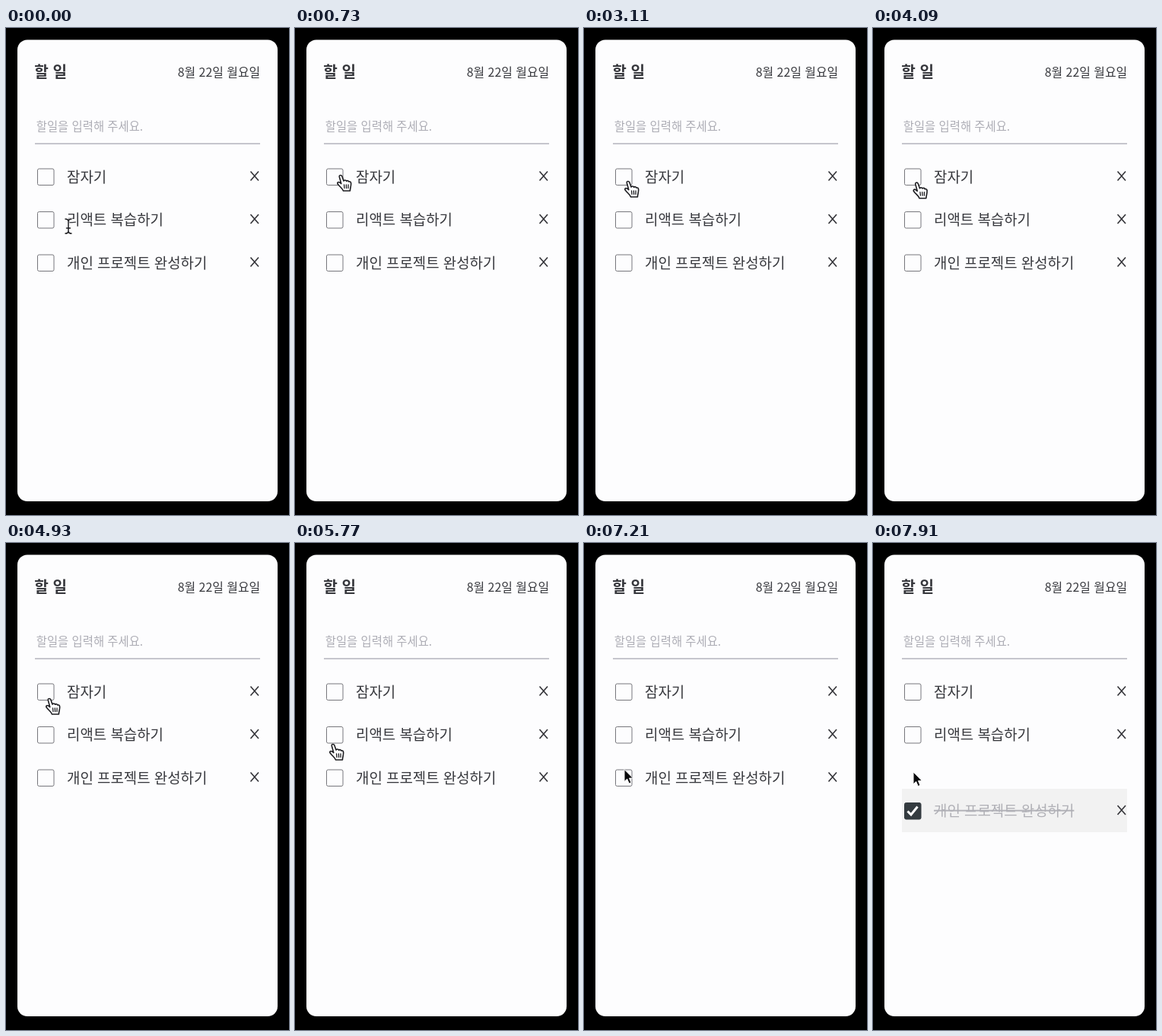
These frames come from a looping animation (372 px wide and 640 px high, 8000 ms). An HTML page:

```html
<!DOCTYPE html>
<html lang="ko">
<head>
<meta charset="utf-8">
<title>할 일</title>
<style>
  html, body { margin: 0; width: 100%; height: 100%; overflow: hidden; background: #000; }
  svg { display: block; width: 372px; height: 640px; font-family: "Noto Sans CJK KR", "Noto Sans CJK", sans-serif; }
  text { fill: #37383d; }
  .title { font-size: 20.2px; font-weight: 700; }
  .date { font-size: 15.9px; text-anchor: end; }
  .hint { font-size: 15.4px; font-weight: 300; fill: #adadb5; }
  .label { font-size: 18.9px; }
  .box { fill: none; stroke: #77777c; }
  .cross { fill: none; stroke: #333338; stroke-width: 1.6; }
  .tick { fill: none; stroke: none; stroke-width: 3; }
  .band { fill: none; }
  .done .band { fill: #f2f2f2; }
  .done .box { fill: #343b40; stroke: #343b40; }
  .done .tick { stroke: #fff; }
  .done .label { fill: #b0b0b6; text-decoration: line-through; }
</style>
</head>
<body>
<svg viewBox="0 0 372 640">
  <rect width="372" height="640"/>
  <rect x="15" y="15.5" width="342" height="606.5" rx="13" fill="#fdfdfe"/>
  <text class="title" x="37.3" y="64.9">할 일</text>
  <text class="date" x="334.2" y="64">8월 22일 월요일</text>
  <text class="hint" x="39.8" y="134.8">할일을 입력해 주세요.</text>
  <path d="M38 152H334" stroke="#b4b4bc" stroke-width="1.3"/>
  <g id="rows"></g>
  <g id="cursor">
    <g id="beam" fill="none" stroke-linecap="round">
      <use href="#beamLine" stroke="#fff" stroke-width="3"/>
      <use href="#beamLine" stroke="#1c1c20" stroke-width="1.5"/>
    </g>
    <path id="arrow" d="M0 0V16L3.7 12.6L6.2 18.6L9 17.4L6.5 11.6H11.5Z" fill="#08080a" stroke="#fdfdfe"/>
    <g id="hand" transform="translate(-5 -1)" stroke="#1c1c20" stroke-width="1.6" stroke-linejoin="round" stroke-linecap="round">
      <path d="M4.2 2.2C4 .2 7 -.2 7.8 1.8L10 8C11 6.6 13 6.8 13.6 8.2C14.6 7.2 16.2 7.6 16.8 9C18.2 8.4 19.6 9.4 19.6 11.2C20 14.5 18.6 16.5 18.4 21H9.5C8.5 18 5.5 16 3 13C.5 10.5 2.5 8.6 4.8 10L6.8 11.6Z" fill="#fff"/>
      <path d="M10.5 13L11 17.5M13.3 13L13.6 17.5M16 13V17.5" fill="none" stroke-width="1.3"/>
    </g>
  </g>
  <defs>
    <path id="beamLine" d="M-4 -9Q-.5 -9 0 -6.5Q.5 -9 4 -9M0 -6.5V7.5M-4 10Q-.5 10 0 7.5Q.5 10 4 10M-2.5 3H2.5"/>
  </defs>
</svg>
<script>
const LOOP = 8000;
const CHECK_AT = 7600;
const LAST_ROW = 308.5, DONE_ROW = 352;
const $ = id => document.getElementById(id);

// time, x, y of the pointer's hot spot
const path = [
  [0, 82, 260], [30, 82, 260], [650, 59, 194], [1610, 59, 194],
  [2570, 59, 194], [3110, 57, 202], [4930, 56, 205], [5070, 56, 205],
  [5750, 49, 265], [5910, 49, 265], [6650, 53, 297.5],
  [7490, 53, 297.5], [7800, 53, 301], [LOOP, 53, 301]
];
const shapes = [[0, 'beam'], [270, 'arrow'], [430, 'hand'], [6110, 'arrow']];

const rowMarkup = (label, y) => `<g class="row" transform="translate(0 ${y})">
  <rect class="band" x="38" y="-29" width="296" height="57"/>
  <rect class="box" x="41.5" y="-10.5" width="21.5" height="21.5" rx="2"/>
  <path class="tick" d="M45.5 .5L50 5L58.5 -5.5"/>
  <text class="label" x="80" y="7">${label}</text>
  <path class="cross" d="M321.5 -7L332 5M332 -7L321.5 5"/>
</g>`;

$('rows').innerHTML = rowMarkup('잠자기', 195.5) + rowMarkup('리액트 복습하기', 252) +
  rowMarkup('개인 프로젝트 완성하기', LAST_ROW);
const lastRow = $('rows').lastElementChild;

const ease = p => p * p * (3 - 2 * p);

function pointerAt(t) {
  const i = Math.max(1, path.findIndex(step => step[0] > t));
  const [t0, x0, y0] = path[i - 1], [t1, x1, y1] = path[i];
  const p = ease((t - t0) / (t1 - t0));
  return [x0 + (x1 - x0) * p, y0 + (y1 - y0) * p];
}

function draw(t) {
  const done = t >= CHECK_AT;
  lastRow.classList.toggle('done', done);
  lastRow.setAttribute('transform', `translate(0 ${done ? DONE_ROW : LAST_ROW})`);
  $('cursor').setAttribute('transform', `translate(${pointerAt(t)})`);
  const shape = shapes.findLast(step => step[0] <= t)[1];
  for (const id of ['beam', 'arrow', 'hand']) $(id).style.display = id === shape ? '' : 'none';
}

const start = performance.now();
function tick() {
  draw((performance.now() - start) % LOOP);
  requestAnimationFrame(tick);
}
tick();
</script>
</body>
</html>
```
